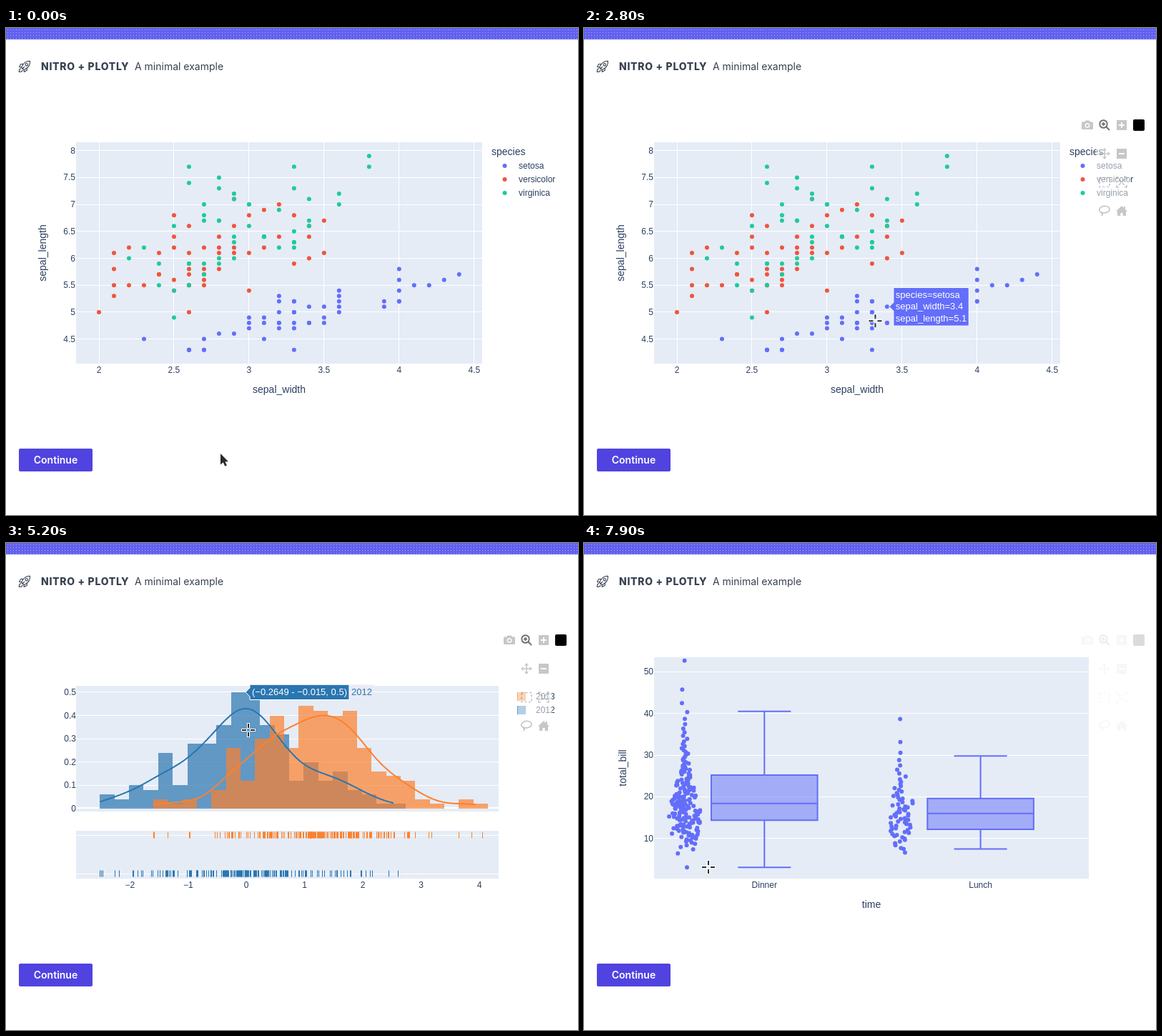
Recreate the animation shown at these times as an HTML page. Size 800 by 682 pixels, loop 8 s.

```html
<!DOCTYPE html>
<html lang="en">
<head>
<meta charset="utf-8">
<title>Charts</title>
<style>
  html, body { margin: 0; width: 800px; height: 682px; overflow: hidden; background: #fff; }
  svg { display: block; }
  text { font: 12px "Liberation Sans", Arial, sans-serif; fill: #2a3f5f; white-space: pre; }
  text.title { font-size: 14px; }
  text.tip { font-size: 13px; }
  .ui text { font: 14px Inter, sans-serif; fill: #374151; }
  .ui text.brand { font-weight: 800; letter-spacing: .05em; }
  .ui text.btn { font-weight: 600; fill: #fff; }
  .grid { stroke: #fff; shape-rendering: crispEdges; }
  .icons { fill: #444; fill-opacity: .3; fill-rule: evenodd; }
  .icons .line { fill: none; stroke: #444; stroke-opacity: .3; stroke-width: 1.7; }
  .icons .active { stroke-opacity: .75; stroke-width: 2; }
  #cursor { fill: #2b2b2b; stroke: #fff; stroke-width: 2; paint-order: stroke; }
</style>
</head>
<body>
<svg width="800" height="682" viewBox="0 0 800 682">
  <defs>
    <pattern id="dots" width="4" height="4" patternUnits="userSpaceOnUse">
      <path d="M2 2h1v1h-1z" fill="#fff" fill-opacity=".5"/>
    </pattern>
  </defs>
  <g class="ui">
    <path d="M0 0h800v16H0z" fill="#6260ee"/>
    <path d="M0 0h800v16H0z" fill="url(#dots)"/>
    <g fill="none" stroke="#374151" stroke-width="1.1" stroke-linejoin="round">
      <path d="M33.5 46.3c-5.500-.2-9.500 3.200-12 8.700l3.700 3.700c5.500-2.500 8.800-6.700 8.300-12.400z"/>
      <circle cx="28.700" cy="51.200" r="1.700"/>
      <path d="M24 50.500h-3.300l-2.200 4 3 .5M29.300 56v3.200l-4 2.300-.3-3M21 56.500l-2.300 1.500-.4 3.500 3.400-.4 1.600-2.200M22.500 57.500l3.500-3.500"/>
    </g>
    <text class="brand" x="49" y="59">NITRO + PLOTLY</text>
    <text x="180" y="59">A minimal example</text>
    <rect x="18" y="589" width="103" height="32" rx="2" fill="#5143e0"/>
    <text class="btn" x="69.500" y="610" text-anchor="middle">Continue</text>
  </g>
  <g id="scatter"></g>
  <g id="dist"></g>
  <g id="box"></g>
  <g id="tip"></g>
  <g id="bar">
    <path d="M716 124h48v144h-48z" fill="#fff" fill-opacity=".5"/>
    <g class="icons">
      <path transform="translate(696 128)" d="M1 3.500h3L5.500 1.500h5L12 3.500h3a1 1 0 0 1 1 1V13a1 1 0 0 1-1 1H1a1 1 0 0 1-1-1V4.500a1 1 0 0 1 1-1zM8 5a3.500 3.500 0 1 0 .01 0zM8 6.500a2 2 0 1 0 .01 0z"/>
      <path class="line active" transform="translate(720 128)" d="M6.500 1.200a5.300 5.300 0 1 0 .01 0zM10.500 10.500l4.500 4.500M4 6.500h5M6.500 4v5"/>
      <path transform="translate(744 128)" d="M1 1h14v14H1zM7 4v3H4v2h3v3h2V9h3V7H9V4z"/>
      <path transform="translate(720 168)" d="M8 0l3 3.500H8.800v3.700h3.700V5L16 8l-3.500 3V8.800H8.800v3.700H11L8 16l-3-3.500h2.200V8.800H3.500V11L0 8l3.500-3v2.200h3.700V3.500H5z"/>
      <path transform="translate(744 168)" d="M1 1h14v14H1zM4 7v2h8V7z"/>
      <path class="line" transform="translate(720 208)" stroke-dasharray="3 2.600" d="M1 1.500h14v13H1z"/>
      <path class="line" transform="translate(744 208)" d="M1 4V1h3M12 1h3v3M15 12v3h-3M4 15H1v-3M4 4l3 3M12 4l-3 3M4 12l3-3M12 12l-3-3"/>
      <path class="line" transform="translate(720 248)" d="M4.500 11C0 9.500-.5 5 3.500 2.800 8 .3 15 1.500 15 5.800c0 4-5.500 5.700-9.500 4.700-3-.8-2 2.500.5 1.500M4.500 11c1.500 1.500.5 3-1 4"/>
      <path transform="translate(744 248)" d="M8 1l3 3V2h2v4l3 2.800h-2V15H9.700v-4H6.300v4H2V8.800H0z"/>
    </g>
    <rect x="768" y="128" width="16" height="16" rx="2"/>
  </g>
  <g id="cursor">
    <path id="arrow" d="M0 0v15.500l3.700-3.300 2.600 5.500 2.600-1.200-2.500-5.300h4.600z"/>
    <path id="cross" d="M-1-9h2v6h-2zM-1 3h2v6h-2zM-9-1h6v2h-6zM3-1h6v2h-6z"/>
    <path id="hand" d="M-2.500 1.200C-2.500-.8 1-.8 1 1.200v5c1-.8 2.800-.6 3 .5 1-.6 2.600-.4 2.800.8 1.300-.5 2.700.2 2.700 1.500 0 4-.5 5.200-1.500 8.300H0C-1.500 14.800-4 12.200-5 10.500c-.8-1.600 1-2.500 2.500-1z"/>
  </g>
</svg>
<script>
const $ = id => document.getElementById(id);
const BLUE = '#2a76b0', ORANGE = '#fd812e', INDIGO = '#636efa', RED = '#ef553b', GREEN = '#1fca9b';

function el(tag, parent, attrs, text) {
  const node = document.createElementNS('http://www.w3.org/2000/svg', tag);
  for (const k in attrs) node.setAttribute(k, attrs[k]);
  if (text !== undefined) node.textContent = text;
  return parent.appendChild(node);
}
const rect = (g, x, y, width, height, fill, opacity = 1) =>
  el('rect', g, { x, y, width, height, fill, 'fill-opacity': opacity });
const dot = (g, cx, cy, fill) => el('circle', g, { cx, cy, r: 3, fill });
const stroke = (g, d, color) => el('path', g, { d, fill: 'none', stroke: color, 'stroke-width': 2 });
const label = (g, x, y, text, anchor = 'start', cls = '') =>
  el('text', g, { x, y, 'text-anchor': anchor, class: cls }, text);
const hline = (g, x0, x1, y, w = 1) =>
  el('path', g, { class: 'grid', d: `M${x0} ${Math.floor(y) + (w % 2) / 2}H${x1}`, 'stroke-width': w });
const vline = (g, x, y0, y1) =>
  el('path', g, { class: 'grid', d: `M${Math.floor(x) + .5} ${y0}V${y1}` });
const yTitle = (g, x, text) =>
  el('text', g, { class: 'title', 'text-anchor': 'middle', transform: `translate(${x} 315) rotate(-90)` }, text);

function seeded(seed) {
  return () => (seed = (seed * 16807) % 2147483647) / 2147483647;
}
const clamp = (v, lo, hi) => Math.max(lo, Math.min(hi, v));
const lerp = (a, b, k) => a + (b - a) * k;
const smooth = k => k * k * (3 - 2 * k);

// Scatter: correlated normal samples, measured to one decimal
const species = [
  { name: 'setosa', color: INDIGO, w: 3.43, l: 5, sw: .38, sl: .35, corr: .74,
    keys: [[2.3, 4.5], [3.3, 5], [3.4, 5.1], [4, 5.8], [4.2, 5.5], [4.4, 5.7]] },
  { name: 'versicolor', color: RED, w: 2.77, l: 5.94, sw: .31, sl: .5, corr: .53,
    keys: [[2, 5], [2.2, 6.2], [2.7, 5.6], [3, 5.4], [3.2, 7], [3.4, 6]] },
  { name: 'virginica', color: GREEN, w: 2.97, l: 6.59, sw: .3, sl: .6, corr: .46,
    keys: [[2.2, 6], [2.5, 4.9], [2.6, 7.7], [3.6, 7.2], [3.8, 7.7], [3.8, 7.9]] }
];
const sx = w => 130 + (w - 2) * 209.9;
const sy = l => 171.7 + (8 - l) * 75.4;

function drawScatter(g) {
  rect(g, 98, 160, 568, 310, '#e5ecf6');
  for (let w = 2; w <= 4.5; w += .5) {
    vline(g, sx(w), 160, 470);
    label(g, sx(w), 483, w, 'middle');
  }
  for (let l = 4.5; l <= 8; l += .5) {
    hline(g, 98, 666, sy(l));
    label(g, 97, sy(l) + 4, l, 'end');
  }
  label(g, 382, 511, 'sepal_width', 'middle', 'title');
  yTitle(g, 56, 'sepal_length');
  label(g, 679, 178, 'species', 'start', 'title');
  const rnd = seeded(2024);
  const normal = () => 2 * (rnd() + rnd() + rnd()) - 3;
  const snap = (v, lo, hi) => Math.round(clamp(v, lo, hi) * 10) / 10;
  species.forEach(({ name, color, w, l, sw, sl, corr, keys }, i) => {
    for (const [kw, kl] of keys) dot(g, sx(kw), sy(kl), color);
    for (let k = keys.length; k < 50; k++) {
      const a = normal(), b = corr * a + Math.sqrt(1 - corr * corr) * normal();
      dot(g, sx(snap(w + sw * a, 2, 4.4)), sy(snap(l + sl * b, 4.3, 7.9)), color);
    }
    dot(g, 697.5, 193 + 19 * i, color);
    label(g, 717, 197 + 19 * i, name);
  });
}

// Histograms in percent; the density curve and the rug follow from them
const BIN = .25, BANDWIDTH = .33;
const dx = v => 336.2 + v * 81.45;
const dy = v => 371.9 - v * 326;
const y12 = { name: 2012, color: BLUE, from: -2.5149, rugY: 463, legendY: 234,
  bins: [6, 4, 10, 8, 24, 10, 28, 28, 36, 50, 50, 36, 32, 12, 20, 12, 16, 8, 6, 2, 2] };
const y13 = { name: 2013, color: ORANGE, from: -1.6006, rugY: 409, legendY: 215,
  bins: [4, 2, 4, 0, 8, 26, 12, 30, 40, 26, 44, 42, 40, 42, 26, 16, 14, 12, 4, 2, 0, 4, 2] };

function density({ from, bins }, v) {
  return bins.reduce((sum, h, i) => {
    const z = (v - from - (i + .5) * BIN) / BANDWIDTH;
    return sum + h / 100 * BIN * Math.exp(-z * z / 2);
  }, 0) / (BANDWIDTH * Math.sqrt(2 * Math.PI));
}

function drawDist(g) {
  rect(g, 98, 200, 591, 176, '#e5ecf6');
  rect(g, 98, 403, 591, 67, '#e5ecf6');
  for (let i = 0; i <= 5; i++) {
    hline(g, 98, 689, dy(i / 10), i ? 1 : 2);
    label(g, 98, dy(i / 10) + 4, i / 10, 'end');
  }
  for (let v = -2; v <= 4; v++) label(g, dx(v), 483, String(v).replace('-', '−'), 'middle');
  const rnd = seeded(77);
  for (const s of [y12, y13]) {
    hline(g, 98, 689, s.rugY);
    s.bins.forEach((h, i) => {
      const v = s.from + i * BIN;
      rect(g, dx(v), dy(h / 100), dx(BIN) - dx(0), h * 3.26, s.color, .7)
        .setAttribute('shape-rendering', 'crispEdges');
      for (let k = 0; k < h / 2; k++)
        rect(g, Math.floor(dx(v + BIN * rnd())), s.rugY - 4.5, 1, 9, s.color);
    });
    rect(g, 715, s.legendY - 6, 12, 12, s.color, .7);
    label(g, 741, s.legendY + 4, s.name);
  }
  for (const s of [y12, y13]) {
    const points = [], end = s.from + (s.bins.length - 1) * BIN + .05;
    for (let v = s.from; v <= end; v += .02) points.push(`${dx(v)} ${dy(density(s, v))}`);
    stroke(g, 'M' + points.join('L'), s.color);
  }
}

// Box plots beside a jittered log-normal cloud
const by = v => 472.3 - v * 5.8425;
const groups = [
  { name: 'Dinner', x: 252.3, cloud: 141, spread: 18, n: 175, sigma: .38, stats: [40.5, 25.2, 18.4, 14.4, 3.07] },
  { name: 'Lunch', x: 554.6, cloud: 444, spread: 14, n: 68, sigma: .36, stats: [29.8, 19.6, 16, 12.2, 7.5] }
];
const normalQuantile = u => (u ** .135 - (1 - u) ** .135) / .1975;

function drawBox(g) {
  rect(g, 98, 160, 608, 310, '#e5ecf6');
  for (let v = 10; v <= 50; v += 10) {
    hline(g, 98, 706, by(v));
    label(g, 97, by(v) + 4, v, 'end');
  }
  label(g, 402, 511, 'time', 'middle', 'title');
  yTitle(g, 59, 'total_bill');
  const rnd = seeded(4242);
  for (const { name, x, cloud, spread, n, sigma, stats } of groups) {
    const [top, q3, med, q1, low] = stats.map(by);
    label(g, x, 483, name, 'middle');
    rect(g, x - 74.3, q3, 148.6, q1 - q3, INDIGO, .5);
    stroke(g, `M${x - 74.3} ${q3}h148.6V${q1}h-148.6zM${x - 74.3} ${med}h148.6M${x} ${q3}V${top}` +
      `M${x} ${q1}V${low}M${x - 37} ${top}h74M${x - 37} ${low}h74`, INDIGO);
    dot(g, cloud + 3, low, INDIGO);
    for (let i = 0; i < n; i++) {
      const y = by(stats[2] * Math.exp(sigma * normalQuantile((i + .5) / n)));
      const half = 4 + spread * Math.exp(-(((y - 384) / 50) ** 2));
      dot(g, cloud + (rnd() * 2 - 1) * half, y, INDIGO);
    }
  }
}

// Hover labels: start, end, content
const iris = ({ name, color }, w, l) => ({
  lines: ['species=' + name, 'sepal_width=' + w, 'sepal_length=' + l],
  x: sx(w) + 3, y: sy(l), bg: color, dark: color === RED
});
const year = (s, text, v, h) =>
  ({ lines: [`(${text})`], x: dx(v), y: dy(h), bg: s.color, dark: s === y13, name: s.name });
const bar = (s, i) => {
  const lo = s.from + i * BIN, h = s.bins[i] / 100;
  const text = [lo, lo + BIN - .0001].map(v => String(+v.toFixed(4)).replace('-', '−')).join(' - ');
  return year(s, `${text}, ${h}`, lo + BIN, h);
};
const tips = [
  [700, 1500, iris(species[1], 2.7, 5.6)],
  [1500, 1600, iris(species[1], 3, 5.4)],
  [1600, 1700, iris(species[0], 3.3, 5)],
  [1700, 2900, iris(species[0], 3.4, 5.1)],
  [4500, 4700, year(y13, '−0.8722723, 0.04401144', -.8722723, .04401144)],
  [4700, 5200, bar(y12, 4)],
  [5200, 5300, bar(y12, 9)],
  [5700, 5900, bar(y13, 11)],
  [5900, 6300, bar(y13, 12)]
];

function drawTip(g, tip) {
  g.replaceChildren();
  if (!tip) return;
  const { lines, x, y, bg, dark, name } = tip;
  const half = lines.length * 8.1 + 2.5, left = x + 6;
  const shape = el('path', g, { fill: bg, stroke: dark ? '#444' : '#fff' });
  const width = 6 + Math.max(...lines.map((line, i) => {
    const text = label(g, left + 3, Math.round(y + 4 + (i - (lines.length - 1) / 2) * 16.4), line, 'start', 'tip');
    text.style.fill = dark ? '#444' : '#fff';
    return text.getComputedTextLength();
  }));
  shape.setAttribute('d', `M${x} ${y}l6-6V${y - half}h${width}V${y + half}H${left}V${y + 6}z`);
  if (name) {
    g.prepend(rect(g, left + width, y - half, 35, half * 2, '#e9eaf5', .8));
    label(g, left + width + 3, Math.round(y + 4), name, 'start', 'tip').style.fill = bg;
  }
}

// Pointer moves: start, end, target
const moves = [
  [200, 800, 284, 352], [1300, 1600, 423, 396], [1600, 1800, 420, 389], [2300, 2400, 433, 395],
  [2700, 3300, 88, 602], [3400, 3500, 87, 604], [4100, 4500, 285, 358], [4500, 4900, 223, 366],
  [5000, 5200, 339, 262], [5200, 5500, 400, 458], [5500, 5900, 462, 285], [5900, 6200, 466, 299],
  [6200, 6800, 87, 601], [7700, 7900, 174, 454]
];
function pointerAt(t) {
  let x = 300, y = 596;
  for (const [a, b, tx, ty] of moves) {
    const k = smooth(clamp((t - a) / (b - a), 0, 1));
    x = lerp(x, tx, k);
    y = lerp(y, ty, k);
  }
  return [x, y];
}
function pointerKind(x, y, right) {
  if (x > 18 && x < 121 && y > 589 && y < 621) return 'hand';
  return x > 98 && x < right && y > 160 && y < 470 ? 'cross' : 'arrow';
}

// The toolbar fades in and out while the pointer is over a chart
const hovers = [[400, 3000], [4280, 6500], [7830, 9000]];
const barOpacity = t => Math.max(...hovers.map(([a, b]) =>
  smooth(clamp(Math.min(t - a, b + 300 - t) / 300, 0, 1))));

const charts = { scatter: [0, 666], dist: [3800, 689], box: [7300, 706] };
const show = (id, on) => { $(id).style.display = on ? '' : 'none'; };

let last = -1, shown;
function frame() {
  const t = Math.floor(performance.now() % 8000 / 100) * 100;
  if (t !== last) {
    last = t;
    const chart = Object.keys(charts).filter(id => t >= charts[id][0]).pop();
    for (const id in charts) show(id, id === chart);
    const [x, y] = pointerAt(t);
    const kind = pointerKind(x, y, charts[chart][1]);
    ['arrow', 'cross', 'hand'].forEach(id => show(id, id === kind));
    $('cursor').setAttribute('transform', `translate(${x} ${y})`);
    $('bar').setAttribute('opacity', barOpacity(t));
    const tip = (tips.find(([a, b]) => t >= a && t < b) || [])[2];
    if (tip !== shown) drawTip($('tip'), shown = tip);
  }
  requestAnimationFrame(frame);
}

drawScatter($('scatter'));
drawDist($('dist'));
drawBox($('box'));
frame();
</script>
</body>
</html>
```
